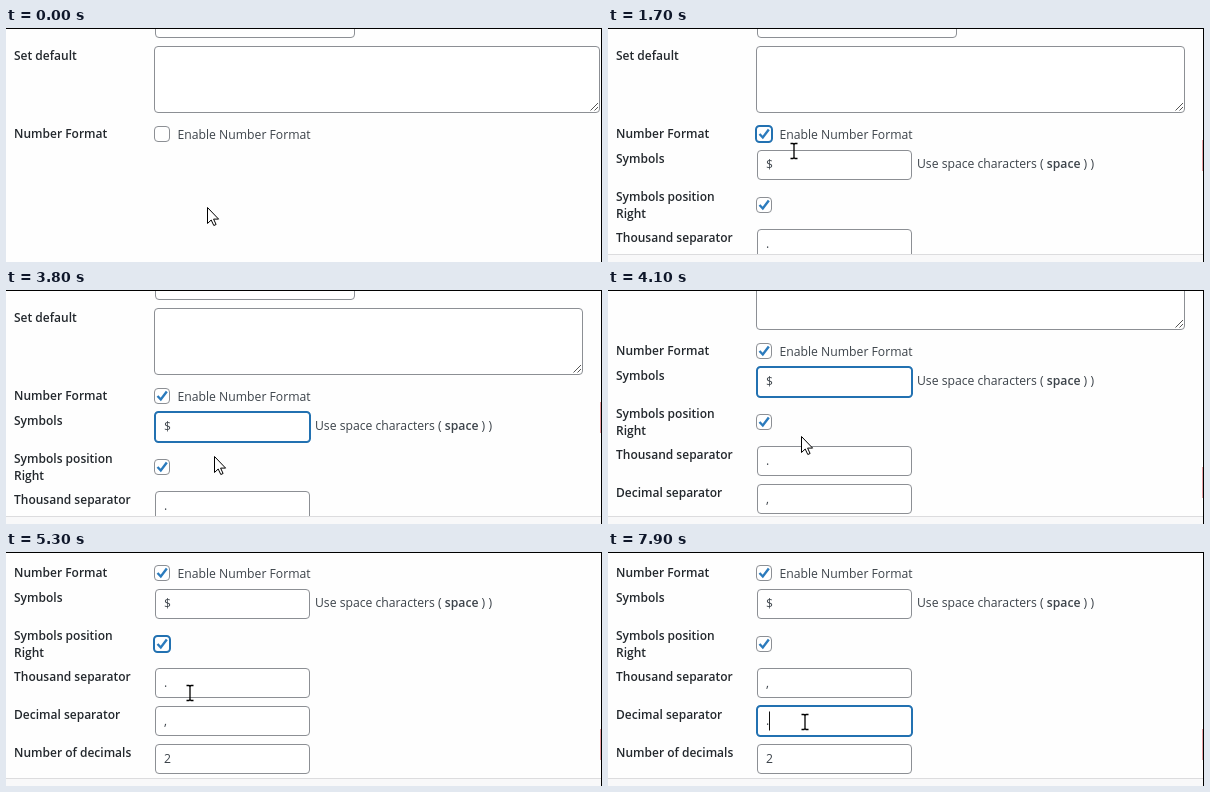
An HTML page that plays this animation: 596x234 px, repeating every 8000 ms.

```html
<!DOCTYPE html>
<html lang="en">
<head>
<meta charset="utf-8">
<title>Number format settings</title>
<style>
  html, body { margin: 0; width: 100%; height: 100%; overflow: hidden; background: #fefefe; }
  svg { display: block; }
  text { font: 12.2px "Open Sans", "Noto Sans", sans-serif; fill: #3c434a; }
  .label { font-size: 12px; font-weight: 600; fill: #23282d; }
  .bold { font-weight: 600; }
  .box { fill: #fff; stroke: #8c8f94; }
  .focus { fill: #fff; stroke: #2271b1; stroke-width: 2; }
  .check { fill: none; stroke: #2b7bbd; stroke-width: 2.4; }
  .cursor { fill: #fff; stroke: #000; stroke-linejoin: round; }
  .beam { fill: none; stroke: #000; stroke-width: 1.3; }
</style>
</head>
<body>
<svg id="stage" width="596" height="234" viewBox="0 0 596 234"></svg>
<script>
const LOOP = 8000, STEP = 100;
const stage = document.getElementById('stage');

// Pointer stops: time, x, y, shape. Equal neighbours are pauses.
const stops = [
  [0, 201, 179, 'arrow'], [100, 201, 179, 'arrow'], [300, 165, 126, 'arrow'],
  [400, 147, 106, 'hand'], [600, 166, 103, 'hand'], [1400, 166, 103, 'hand'],
  [1600, 182, 119, 'beam'], [1900, 195, 131, 'beam'], [2000, 195, 131, 'beam'],
  [2300, 158, 136, 'beam'], [3200, 158, 136, 'beam'],
  [3400, 224, 160, 'arrow'], [3500, 224, 160, 'arrow'],
  [3800, 208, 166, 'arrow'], [4000, 208, 166, 'arrow'], [4300, 162, 106, 'arrow'],
  [4500, 154, 87, 'hand'], [5000, 154, 87, 'hand'],
  [5300, 184, 141, 'beam'], [6100, 184, 141, 'beam'],
  [6300, 126, 131, 'arrow'], [6600, 126, 131, 'arrow'],
  [6900, 165, 168, 'beam'], [7000, 165, 168, 'beam'], [7200, 97, 167, 'beam'],
  [7300, 97, 167, 'beam'], [7500, 100, 167, 'beam'], [7800, 100, 167, 'beam'],
  [7900, 197, 170, 'beam'], [LOOP, 197, 170, 'beam']
];

const shapes = {
  arrow: '<path class="cursor" d="M.5.5v16l3.7-3.5 2.6 5.5 2.3-1-2.5-5.4h5z"/>',
  hand: '<path class="cursor" transform="translate(-6)" d="M5 12V2q0-1.5 1.5-1.5T8 2v5.5q2.7-.8 3 1 2.3-.7 2.8 1 2.7-.5 2.7 2v4q0 3-2 5v1.5H6.5V20L1 14q-1-2 .5-2.6 1.500-.4 3.500 2z"/>',
  beam: '<path class="beam" d="M-3.500-7.500h2.500l1 1 1-1h2.500M0-6.500v13M-3.500 7.500h2.500l1-1 1 1h2.500"/>'
};

const between = (t, a, b) => t >= a && t < b;
const text = (x, y, s, cls = '') => `<text x="${x}" y="${y}" class="${cls}">${s}</text>`;
const label = (y, s) => text(8, y, s, 'label');
const rect = (x, y, w, h, rest) => `<rect x="${x}" y="${y}" width="${w}" height="${h}" ${rest}/>`;

function checkbox(y, checked, focused) {
  const frame = focused
    ? rect(148, y - .5, 16, 16, 'rx="3.5" class="focus"')
    : rect(148.5, y, 15, 15, 'rx="3.5" class="box"');
  return frame + (checked ? `<path class="check" d="M151.500 ${y + 7.5}l3.300 3.500 6-8"/>` : '');
}

function field(y, value, { focused, selected = 0, caret } = {}) {
  let out = focused
    ? rect(149, y - .5, 155, 30, 'rx="3.5" class="focus"')
    : rect(149.5, y, 154, 29, 'rx="3.5" class="box"');
  if (selected) out += rect(158, y + 1, selected, 27, 'fill="#2a62d0"');
  out += `<g ${selected ? 'style="filter:brightness(5)"' : ''}>${text(158, y + 18.500, value)}</g>`;
  if (caret) out += rect(caret, y + 5, 1, 19, 'fill="#111"');
  return out;
}

function pointer(t) {
  const i = Math.max(1, stops.findIndex(s => s[0] >= t));
  const [t0, x0, y0] = stops[i - 1], [t1, x1, y1, shape] = stops[i];
  const p = (t - t0) / (t1 - t0);
  const x = Math.round(x0 + (x1 - x0) * p), y = Math.round(y0 + (y1 - y0) * p);
  return `<g transform="translate(${x} ${y})">${shapes[shape]}</g>`;
}

function options(t) {
  const blink = start => (t - start) % 1000 < 500;
  const symbol = {
    focused: between(t, 2200, 4500),
    selected: between(t, 2300, 3300) && 8,
    caret: between(t, 3300, 4500) && blink(3300) && 165
  };
  const thousand = {
    focused: between(t, 5500, 7000),
    selected: between(t, 6200, 6700) && 3,
    caret: (between(t, 5500, 6200) && blink(5500) || between(t, 6700, 7000)) && 161
  };
  const decimal = {
    focused: t >= 7000,
    selected: between(t, 7100, 7900) && 3,
    caret: t >= 7900 && 161
  };
  return label(135, 'Symbols') + field(122.5, '$', symbol)
    + text(309, 140, 'Use space characters ( <tspan class="bold">space</tspan> ) )')
    + label(173, 'Symbols position') + label(190, 'Right')
    + checkbox(169.5, !between(t, 4600, 4700), between(t, 4500, 5500))
    + label(214, 'Thousand separator') + field(201.5, t < 6700 ? '.' : ',', thousand)
    + label(252, 'Decimal separator') + field(239.5, t < 7900 ? ',' : '.', decimal)
    + label(290, 'Number of decimals') + field(277.5, '2');
}

function render(t) {
  const open = t >= 900;
  const scroll = t < 4100 ? 0 : t < 4200 ? 45 : 85;
  const right = open ? 576.5 : 593.5;
  const form = rect(149.5, -20, 199, 29.5, 'rx="3.5" class="box"')
    + label(32, 'Set default')
    + rect(148.5, 18.5, right - 148.5, 66, 'rx="3.5" class="box"')
    + `<path d="M${right - 9} 82.500l7.500-7.500m-3.500 7.500l3.500-3.500" stroke="#555" fill="none"/>`
    + label(110, 'Number Format')
    + checkbox(98.5, open, between(t, 900, 2200))
    + text(171.5, 111, 'Enable Number Format')
    + (open ? options(t) : '');
  const footer = rect(0, 226, 596, 8, 'fill="#f8f8f9"') + rect(0, 226, 596, 1, 'fill="#dcdcde"')
    + rect(594, scroll ? 177 : 112, 1, 31, 'fill="#e9a0a4"');
  stage.innerHTML = rect(0, 0, 596, 234, 'fill="#fefefe"')
    + `<g transform="translate(0 ${-scroll})">${form}</g>`
    + (open ? footer : '')
    + rect(0, 0, 596, 1, 'fill="#000"') + rect(595, 0, 1, 234, 'fill="#000"')
    + pointer(t);
}

let shown = -1;
function tick() {
  const t = Math.floor(performance.now() % LOOP / STEP) * STEP;
  if (t !== shown) render(shown = t);
  requestAnimationFrame(tick);
}
tick();
</script>
</body>
</html>
```
